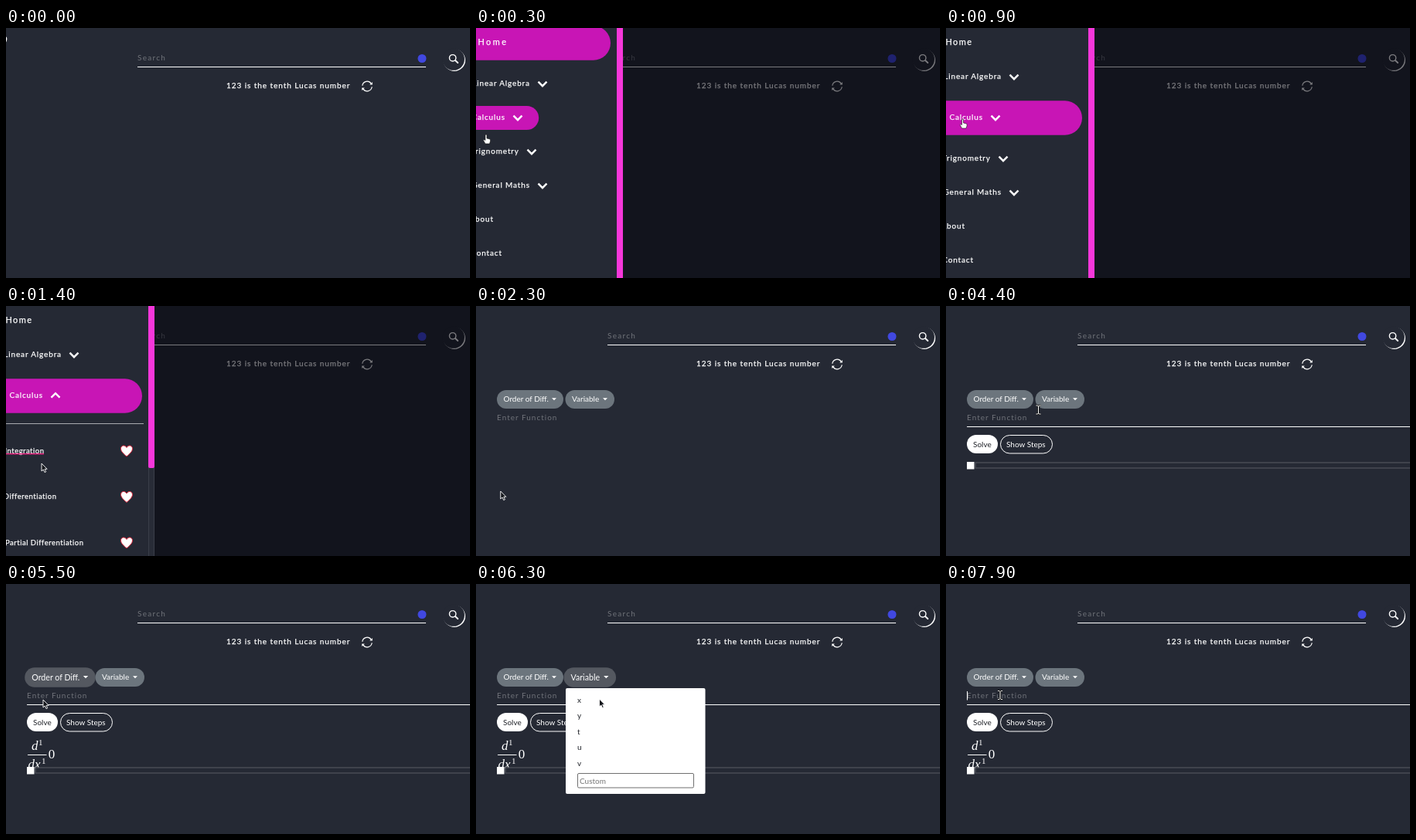
Recreate the animation shown at these times as an HTML page. Size 600 px wide and 324 px high, loop 8000 ms.

```html
<!DOCTYPE html>
<html lang="en">
<head>
<meta charset="utf-8">
<title>Maths menu</title>
<style>
html, body { margin: 0; width: 100%; height: 100%; overflow: hidden; background: #252934; }
svg { display: block; width: 600px; height: 324px; font: 10px Lato, "Open Sans", sans-serif; fill: #fff; }
.wide { letter-spacing: .93px; }
.hint { fill: #70737a; letter-spacing: 1px; }
.nav { letter-spacing: .85px; text-anchor: end; }
.sub { font-size: 9.5px; letter-spacing: .5px; text-anchor: end; }
.wide, .nav, .sub { stroke: #fff; stroke-width: .25px; }
.line { fill: none; stroke: #fff; }
.dark { fill: #22252b; }
.math { font-family: "Liberation Serif", "Noto Serif", serif; font-size: 17px; }
.math .sup { font-size: 11px; }
</style>
</head>
<body>
<svg viewBox="0 0 600 324" xmlns="http://www.w3.org/2000/svg">
  <rect width="600" height="324" fill="#252934"/>
  <path id="menuEdge" class="line" stroke-width="1.3" d="M-1 11.5Q1 12 .6 15T-1 18.5"/>

  <text class="hint" x="170" y="42" style="letter-spacing:1.3px">Search</text>
  <path class="line" d="M170 50.5H543"/>
  <circle cx="538" cy="39.5" r="5.5" fill="#4148e0"/>
  <circle cx="579.8" cy="41.7" r="14.2"/>
  <circle cx="578.7" cy="40.6" r="14.2" fill="#252934"/>
  <g class="line" stroke-width="1.4" stroke-linecap="round">
    <circle cx="577.6" cy="38.8" r="4.2"/>
    <path stroke-width="1.9" d="M581 42L584.2 45"/>
  </g>
  <text class="wide" x="285" y="78">123 is the tenth Lucas number</text>
  <g transform="translate(467 75.5)">
    <path class="line" stroke-width="1.2" d="M-6.2 -.8A6.2 6.2 0 0 1 5.2 -3.4M6.2 .8A6.2 6.2 0 0 1 -5.2 3.4"/>
    <path d="M6.8 -5.6V-2H3.2ZM-6.8 5.6V2H-3.2Z"/>
  </g>

  <g id="solver">
    <g id="order"></g>
    <g id="variable"></g>
    <text class="hint" x="27" y="148">Enter Function</text>
    <path id="caret" class="line" d="M27.5 139V150.5"/>
    <g id="form">
      <path class="line" d="M27 156.5H600"/>
      <rect x="27" y="167" width="40" height="24" rx="12"/>
      <text class="dark" x="35" y="182.5">Solve</text>
      <rect class="line" x="70.5" y="167.5" width="67" height="23.5" rx="11.8"/>
      <text x="78" y="182.5">Show Steps</text>
      <g id="formula" class="math">
        <text x="33" y="215" font-style="italic">d</text><text class="sup" x="42" y="209">1</text>
        <path class="line" d="M28 221.5H52.5"/>
        <text x="28.5" y="239" font-style="italic">dx</text><text class="sup" x="46" y="232.5">1</text>
        <text x="54.8" y="226">0</text>
      </g>
      <g id="slider">
        <rect x="38" y="203" width="570" height="7" fill="#252934" stroke="#4b4e57" stroke-width="1.4"/>
        <rect x="27" y="202" width="9.5" height="9.5"/>
      </g>
    </g>
    <g id="orderMenu"></g>
    <g id="variableMenu"></g>
  </g>

  <rect id="dim" width="600" height="324" fill="#000108"/>
  <clipPath id="subClip"><rect id="subRect" y="140" width="184"/></clipPath>
  <g id="sidebar">
    <rect x="-20" width="212" height="324" fill="#252934"/>
    <g id="nav"></g>
    <g id="submenu" clip-path="url(#subClip)"></g>
    <rect x="184.5" y="-2" width="7" height="328" fill="#282c37" stroke="#3a3e49"/>
    <rect id="thumb" x="184" y="-4" width="8" rx="2" fill="#f637da"/>
  </g>

  <g id="cursor" stroke-linejoin="round">
    <path id="arrow" d="M0 0V10L2.3 8L4 11.6L5.7 10.8L4.1 7.3H7.1Z" fill="#15171c" stroke="#fff" stroke-width=".9"/>
    <path id="hand" d="M-1.5 -6Q0 -6.5 0 -5V-1L4 0Q5 .5 4.5 3L3.5 6H-2L-4.5 1.5Q-4 0 -2 1.5V-5Z" fill="#fff" stroke="#111" stroke-width=".6"/>
    <g id="beam" fill="none">
      <path d="M-3 -5.5H-1L0 -4.5L1 -5.5H3M0 -4.5V4.5M-3 5.5H-1L0 4.5L1 5.5H3" stroke="#111" stroke-width="2.4"/>
      <path d="M-3 -5.5H-1L0 -4.5L1 -5.5H3M0 -4.5V4.5M-3 5.5H-1L0 4.5L1 5.5H3" stroke="#fff"/>
    </g>
  </g>
</svg>
<script>
const LOOP = 8000, STEP = 100;
const $ = id => document.getElementById(id);
const set = (node, attrs) => { for (const k in attrs) node.setAttribute(k, attrs[k]); };
const show = (id, on) => $(id).style.display = on ? '' : 'none';
const ramp = (t, a, b) => Math.min(1, Math.max(0, (t - a) / (b - a)));
const easeOut = p => 1 - (1 - p) ** 3;
const smooth = p => p * p * (3 - 2 * p);
const between = (t, a, b) => t >= a && t < b;

// label, right end of the text, has a submenu
const navItems = [
  ['Home', 33, 0], ['Linear Algebra', 71, 1], ['Calculus', 39, 1], ['Trignometry', 57, 1],
  ['General Maths', 71, 1], ['About', 24, 0], ['Contact', 35, 0]
];
const subItems = [['Integration', 49], ['Differentiation', 65], ['Partial Differentiation', 100]];

// time, x, y, shape
const cursorKeys = [
  [0, -14, 15, 'arrow'], [100, -8, 20, 'hand'], [300, 14, 144, 'hand'], [800, 22, 124, 'hand'],
  [1100, 24, 124, 'hand'], [1200, 40, 160, 'arrow'], [1400, 46, 204, 'arrow'], [1800, 32, 243, 'hand'],
  [2100, 32, 240, 'arrow'], [2500, 31.5, 240, 'arrow'], [2700, 50, 204, 'arrow'], [3200, 95, 182, 'arrow'],
  [3600, 112, 164, 'arrow'], [3900, 124, 148, 'beam'], [4300, 124, 148, 'beam'], [4400, 119.5, 134.5, 'beam'],
  [4500, 95, 124, 'hand'], [4900, 80, 121, 'hand'], [5100, 62, 146, 'arrow'], [5500, 48, 150, 'arrow'],
  [5800, 90, 140, 'beam'], [6000, 146, 123, 'hand'], [6200, 150, 123, 'hand'], [6300, 159.5, 149, 'arrow'],
  [6500, 140, 150, 'arrow'], [6800, 136, 149, 'arrow'], [7100, 100, 146, 'beam'], [7400, 70, 144, 'beam'],
  [8000, 70, 144, 'beam']
];

const dropButton = (x, w, label) => `
  <rect x="${x}" y="109" width="${w}" height="24" rx="12"/>
  <text x="${x + 8.5}" y="124.3">${label}</text>
  <path d="M${x + w - 15} 119.2h6l-3 3z"/>`;

function menu(x, items) {
  const customY = 143.5 + items.length * 20.4;
  return `<rect x="${x}" y="135" width="180.5" height="${customY - 108.5}" rx="2"/>` +
    items.map((s, i) => `<text class="dark" x="${x + 15}" y="${154 + i * 20.4}">${s}</text>`).join('') +
    `<rect x="${x + 15.5}" y="${customY}" width="150" height="18.5" rx="1.5" stroke="#6f6f6f"/>
     <text x="${x + 18}" y="${customY + 13}" fill="#757575">Custom</text>`;
}

$('order').innerHTML = dropButton(27, 86, 'Order of Diff.');
$('variable').innerHTML = dropButton(115.5, 63.5, 'Variable');
$('orderMenu').innerHTML = menu(27, ['1', '2', '3', '4']);
$('variableMenu').innerHTML = menu(116, ['x', 'y', 't', 'u', 'v']);

$('nav').innerHTML = navItems.map(([label, , more]) => `<g>
  <rect x="-60" fill="#c815b5"/><text class="nav" y="3.2">${label}</text>
  ${more ? '<path class="line" stroke-width="2.5" d="M-5.5 -2.5L0 3L5.5 -2.5"/>' : ''}</g>`).join('');

$('submenu').innerHTML = '<path d="M0 152.5H178" stroke="#a9abb0"/>' + subItems.map(([label, end], i) => {
  const y = 187.5 + i * 59.5;
  return `<text class="sub" x="${end + .5}" y="${y + 3.1}">${label}</text>
    <rect class="under" y="${y + 3.4}" width="${end}" height="1.5" fill="#e8237f"/>
    <path transform="translate(156 ${y})" stroke="#dc2238"
      d="M0 7.5C-4 4-7.5 1-7.5 -2.7C-7.5 -7-2 -8 0 -4C2 -8 7.5 -7 7.5 -2.7C7.5 1 4 4 0 7.5Z"/>`;
}).join('');
const navNodes = [...$('nav').children];
const underlines = [...document.querySelectorAll('.under')];
navNodes[0].children[1].style.fontSize = '11px';

function drawNav(t, open) {
  const homeHover = 1 - smooth(ramp(t, 300, 700));
  const calcHover = smooth(ramp(t, 290, 700));
  const hover = [homeHover, 0, calcHover, 0, 0, 0, 0];
  let y = 19;
  navNodes.forEach((node, i) => {
    const [, end, more] = navItems[i], h = hover[i];
    if (i) y += 44 + 9 * (h + hover[i - 1]) + (i === 3 ? 178 * open : 0);
    const [pill, text, chevron] = node.children;
    const x = end + 8 * h, height = 31 + 13.5 * h;
    const spacing = i ? .85 : 1.4 + h;
    set(node, { transform: `translate(0 ${y})` });
    set(pill, {
      width: 143 + 93 * h, height, y: .5 - height / 2, rx: height / 2,
      opacity: i === 2 ? (t >= 300 ? 1 : 0) : h
    });
    set(text, { x: x + spacing });
    text.style.letterSpacing = spacing + 'px';
    if (more) set(chevron, { transform: `translate(${x + 17} .2) scale(1 ${i === 2 ? 1 - 2 * open : 1})` });
  });
}

function drawSidebar(t) {
  const slide = t < 2000 ? easeOut(ramp(t, 50, 370)) : 1 - smooth(ramp(t, 1950, 2300));
  const open = smooth(ramp(t, 1000, 1300));
  show('sidebar', slide > 0);
  set($('sidebar'), { transform: `translate(${192 * (slide - 1)} 0)` });
  const fade = t < 2000 ? ramp(t, 0, 250) : slide;
  set($('dim'), { opacity: .52 * fade });
  drawNav(t, open);
  show('submenu', open > 0);
  set($('subRect'), { height: 190 * open });
  set($('thumb'), { height: 4 + 324 * 324 / (324 + 176 * open) + 4 * (1 - open) });
  underlines[0].style.display = between(t, 1300, 1600) ? '' : 'none';
  underlines[1].style.display = between(t, 1700, 2400) ? '' : 'none';
  underlines[2].style.display = 'none';
}

function drawButton(id, cx, hover) {
  const scale = 1 + .065 * hover, mix = (a, b) => Math.round(a + (b - a) * hover);
  set($(id), { transform: `translate(${cx} 121) scale(${scale}) translate(${-cx} -121)` });
  set($(id).firstElementChild, { fill: `rgb(${mix(108, 84)},${mix(117, 88)},${mix(125, 96)})` });
}

function drawSolver(t) {
  const hoverIn = (a, b) => smooth(ramp(t, a, a + 200)) * (1 - smooth(ramp(t, b, b + 200)));
  show('solver', t >= 2300);
  show('form', t >= 2600);
  const chosen = t >= 5500;
  show('formula', chosen);
  set($('slider'), { transform: `translate(0 ${chosen ? 35 : 0})` });
  drawButton('order', 70, hoverIn(4400, 5500));
  drawButton('variable', 147, hoverIn(5900, 6700));
  show('orderMenu', between(t, 4900, 5500));
  show('variableMenu', between(t, 6200, 6800));
  show('caret', t >= 7500);
}

function drawCursor(t) {
  const next = Math.max(1, cursorKeys.findIndex(k => k[0] > t));
  const [t0, x0, y0, shape] = cursorKeys[next - 1], [t1, x1, y1] = cursorKeys[next];
  const p = smooth(ramp(t, t0, t1));
  set($('cursor'), { transform: `translate(${x0 + (x1 - x0) * p} ${y0 + (y1 - y0) * p})` });
  for (const id of ['arrow', 'hand', 'beam']) show(id, id === shape);
}

function draw(t) {
  show('menuEdge', t < 2300);
  drawSidebar(t);
  drawSolver(t);
  drawCursor(t);
}

const start = performance.now();
function tick() {
  const t = (performance.now() - start) % LOOP;
  draw(Math.floor(t / STEP) * STEP);
  requestAnimationFrame(tick);
}
draw(0);
requestAnimationFrame(tick);
</script>
</body>
</html>
```
